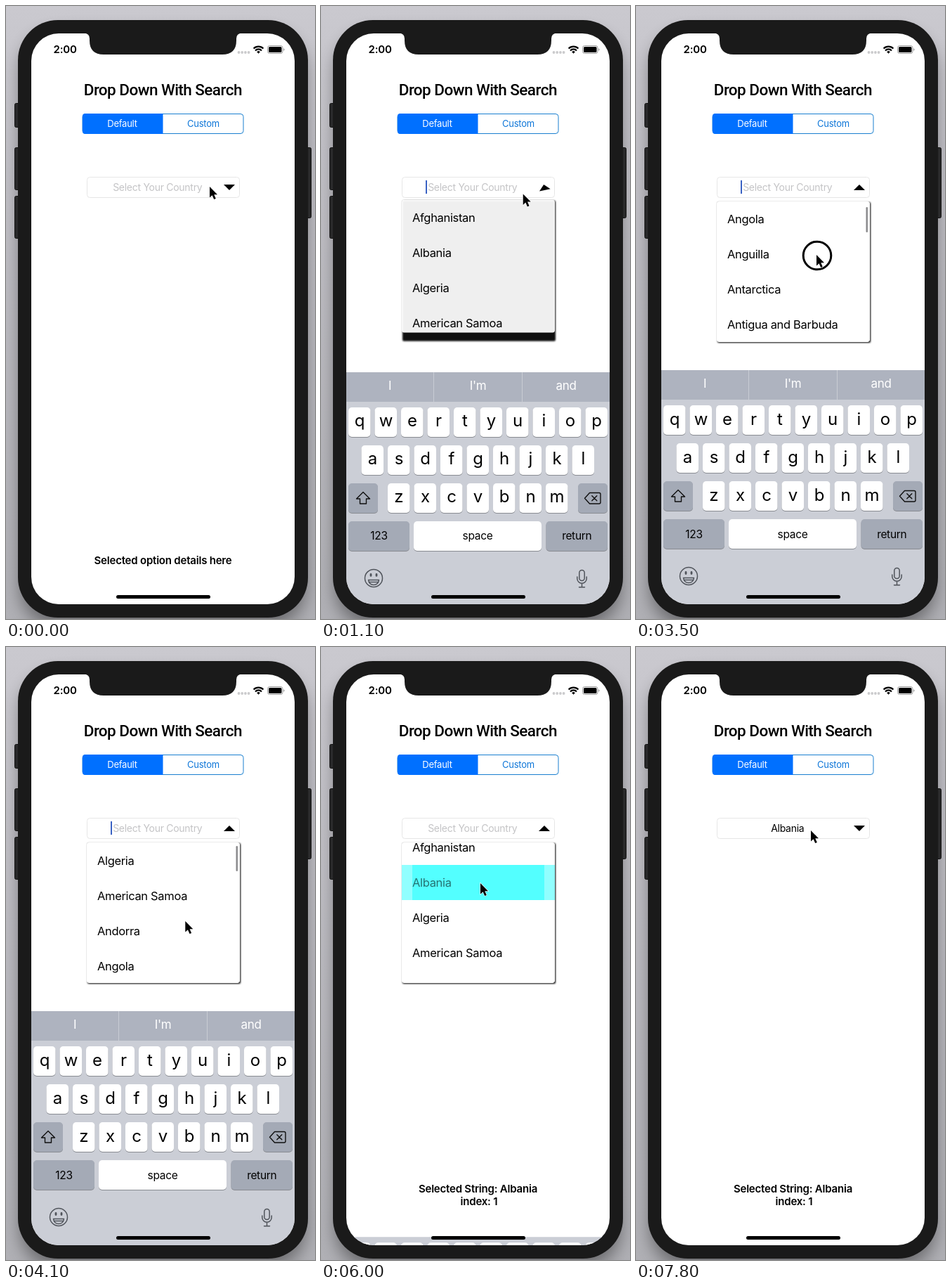
An HTML page for the animation above (8000 ms loop, 440 by 872 pixels).

```html
<!DOCTYPE html>
<html lang="en">
<head>
<meta charset="utf-8">
<title>Drop Down With Search</title>
<style>
  html, body { margin: 0; width: 100%; height: 100%; overflow: hidden; background: #bdbcc2; }
  svg { display: block; width: 440px; height: 872px; font-family: Inter, "Liberation Sans", sans-serif; }
  text { white-space: pre; letter-spacing: -.02em; }
  .mid { text-anchor: middle; }
  .bold { font-weight: 600; letter-spacing: -.014em; }
</style>
</head>
<body>
<svg viewBox="0 0 440 872">
  <defs>
    <linearGradient id="wall" x1="0" y1="0" x2="0" y2="1">
      <stop offset="0" stop-color="#cac9cf"/>
      <stop offset=".3" stop-color="#c0bfc5"/>
      <stop offset="1" stop-color="#b0b0b5"/>
    </linearGradient>
    <filter id="glow" x="-20%" y="-20%" width="140%" height="140%"><feGaussianBlur stdDeviation="12"/></filter>
    <filter id="soft" x="-10%" y="-10%" width="120%" height="120%"><feGaussianBlur stdDeviation="1.2"/></filter>
    <clipPath id="screen"><rect x="36" y="39" width="375" height="812" rx="39"/></clipPath>
    <clipPath id="listClip"><rect id="clipBox" x="115" width="218" rx="3"/></clipPath>
  </defs>

  <rect width="440" height="872" fill="url(#wall)"/>
  <rect x="20" y="38" width="407" height="846" rx="56" opacity=".4" filter="url(#glow)"/>
  <g fill="#29292a" stroke="#111">
    <rect x="12.5" y="138.5" width="8" height="34" rx="2"/>
    <rect x="12.5" y="201.5" width="8" height="60" rx="2"/>
    <rect x="12.5" y="270.5" width="8" height="60" rx="2"/>
    <rect x="426.5" y="201.5" width="8" height="100" rx="2"/>
  </g>
  <rect x="17" y="20" width="413" height="850" rx="57" fill="#1a1a1a"/>

  <g clip-path="url(#screen)">
    <rect x="36" y="39" width="375" height="812" fill="#fff"/>
    <text class="bold" x="67.5" y="67" font-size="15">2:00</text>
    <g fill="#cbcbcd"><circle cx="331.5" cy="66" r="1.9"/><circle cx="336.2" cy="66" r="1.9"/><circle cx="340.9" cy="66" r="1.9"/><circle cx="345.6" cy="66" r="1.9"/></g>
    <g fill="none" stroke="#000" stroke-width="2.2">
      <path d="M352.6 60.6a9.6 9.6 0 0 1 13.8 0M355 63.4a6.2 6.2 0 0 1 9 0"/>
      <path d="M359.5 67.8l-2.3-2.6a3.3 3.3 0 0 1 4.6 0z" fill="#000" stroke="none"/>
    </g>
    <rect x="372.5" y="56.5" width="21.500" height="11" rx="3" fill="none" stroke="#999"/>
    <rect x="374" y="58" width="18.500" height="8" rx="1.600"/>
    <path d="M395.300 60.300q1.400.4 1.400 1.700t-1.400 1.700z" fill="#999"/>

    <text class="mid" x="223.300" y="126.500" font-size="22.500" font-weight="500" style="font-family:Roboto,sans-serif;letter-spacing:-.55px">Drop Down With Search</text>
    <rect x="109" y="153.500" width="229" height="28" rx="4" fill="#fff" stroke="#1a7fd0"/>
    <path d="M223.500 153v29H113a4 4 0 0 1-4-4v-21a4 4 0 0 1 4-4z" fill="#0070ff"/>
    <text class="mid" x="165.500" y="172.300" font-size="13" fill="#fff">Default</text>
    <text class="mid" x="281" y="172.300" font-size="13" fill="#0e76d8">Custom</text>

    <text id="hint" class="mid bold" x="223.500" y="793.500" font-size="15">Selected option details here</text>
    <g id="result" class="mid bold" font-size="15">
      <text x="223.500" y="776" class="bold">Selected String: Albania</text>
      <text x="225" y="793.500" class="bold">index: 1</text>
    </g>

    <rect id="shade" x="116" width="218" height="200" rx="2" filter="url(#soft)"/>
    <g id="list" clip-path="url(#listClip)">
      <rect id="paper" x="115" width="218" rx="3" fill="#fff"/>
      <g id="rows" font-size="16.500"></g>
      <rect id="bar" x="327.500" width="2.500" rx="1.250" fill="#8c8c8e"/>
    </g>

    <rect x="115.500" y="243.500" width="217" height="29" rx="4" fill="#fff" stroke="#e6e6e6"/>
    <text id="field" class="mid" x="215.800" y="262.800" font-size="14"></text>
    <rect id="caret" x="149" y="248" width="2" height="19" fill="#3a62c4"/>
    <path id="arrow" d="M-8-4H8L0 4z"/>

    <g id="keyboard"></g>
    <rect x="157" y="838" width="134" height="5" rx="2.500"/>
  </g>
  <path d="M111 38.500q8 .5 8 8v2.500q0 20 20 20h169q20 0 20-20v-2.500q0-7.500 8-8z" fill="#1a1a1a"/>

  <g id="cursor">
    <circle id="ring" cx="1" cy="1" r="19.800" fill="none" stroke="#000" stroke-width="3"/>
    <path d="M0 0V15.500L3.600 12.200L6.200 18L8.800 16.900L6.300 11.200H11z" stroke="#fff" stroke-width="1.200" paint-order="stroke"/>
  </g>
</svg>

<script>
const $ = id => document.getElementById(id);
const set = (id, attrs) => { for (const k in attrs) $(id).setAttribute(k, attrs[k]); };
const show = (id, on) => { $(id).style.display = on ? '' : 'none'; };
const clamp = v => Math.min(1, Math.max(0, v));

const OPEN = 735, KEYS_UP = 729, PICK = 5726, CLOSE = PICK + 400, REFRESH = PICK + 500;
const countries = ['Afghanistan', 'Albania', 'Algeria', 'American Samoa', 'Andorra', 'Angola',
  'Anguilla', 'Antarctica', 'Antigua and Barbuda', 'Argentina', 'Armenia'];

// Each entry: time, then values
const pointer = [[0, 290, 257], [900, 290, 257], [1900, 268, 357], [2200, 268, 357], [2400, 267, 378],
  [2700, 262, 322], [3300, 257, 354], [3500, 257, 354], [3900, 256, 420], [4400, 254, 335], [4500, 254, 335],
  [4800, 255, 368], [4950, 255, 369], [5200, 232, 354], [5400, 227, 336], [6100, 227, 336],
  [6800, 281, 318], [7100, 296, 315], [7200, 296, 315], [7800, 249, 261]];
const scroll = [[2400, 0], [2700, 60], [3300, 250], [3500, 250], [3900, 170], [4350, 0], [4500, 0],
  [4800, -16.5], [4950, -17], [5150, 0], [5200, 0], [5400, 18]];
const presses = [[400, 600], [2400, 2700], [3400, 3900], [4500, 5000], [5200, 5400], [5600, 5700]];

function track(keys, t) {
  const i = keys.findIndex(k => k[0] > t);
  if (i < 0) return keys[keys.length - 1].slice(1);
  if (i === 0) return keys[0].slice(1);
  const a = keys[i - 1], b = keys[i];
  let u = (t - a[0]) / (b[0] - a[0]);
  u = u * u * (3 - 2 * u);
  return a.slice(1).map((v, j) => v + (b[j + 1] - v) * u);
}

// Spring progress 0 to 1; damping 1 is critical
function spring(ms, damping, freq) {
  if (ms <= 0) return 0;
  const s = ms / 1000, d = damping * freq;
  if (damping === 1) return 1 - (1 + d * s) * Math.exp(-d * s);
  const w = freq * Math.sqrt(1 - damping * damping);
  return 1 - Math.exp(-d * s) * (Math.cos(w * s) + d / w * Math.sin(w * s));
}

function buildKeyboard() {
  const label = (x, y, str, size, fill = '#000') =>
    `<text class="mid" x="${x}" y="${y}" font-size="${size}" fill="${fill}">${str}</text>`;
  const key = (x, y, w, str = '', size = 24, fill = '#fff') =>
    `<rect x="${x}" y="${y + 1}" width="${w}" height="42" rx="5" fill="#898c92"/>` +
    `<rect x="${x}" y="${y}" width="${w}" height="42" rx="5" fill="${fill}"/>` +
    label(x + w / 2, y + (size > 20 ? 27.5 : 26.5), str, size);
  const row = (x, y, letters) => [...letters].map((c, i) => key(x + i * 37.5, y, 31.5, c)).join('');
  const gray = '#a4aab6';
  $('keyboard').innerHTML =
    '<g id="tips"><path d="M36 518h375v42H36z" fill="#aeb3bf"/>' +
    '<path d="M160.5 518v42M286.5 518v42" stroke="#c9ccd4"/>' +
    label(98, 543, 'I', 17, '#fff') + label(223.5, 543, "I'm", 17, '#fff') + label(349, 543, 'and', 17, '#fff') + '</g>' +
    '<path d="M36 560h375v291H36z" fill="#cbced6"/>' +
    row(39, 568, 'qwertyuiop') + row(57.5, 622, 'asdfghjkl') + row(95, 676, 'zxcvbnm') +
    key(39, 676, 42, '', 24, gray) + key(366, 676, 42, '', 24, gray) +
    key(39, 730, 87, '123', 15.5, gray) + key(132, 730, 182, 'space', 15.5) + key(320.5, 730, 87.5, 'return', 15.5, gray) +
    '<g fill="none" stroke="#111" stroke-width="1.4" stroke-linejoin="round" stroke-linecap="round">' +
    '<path d="M60 688.500l9.500 9.500h-5v7h-9v-7h-5z"/>' +
    '<path d="M382.500 689.500H396q2 0 2 2v11.500q0 2-2 2H382.500L375.500 697.300zM385.800 693.800l7 7m0-7l-7 7"/></g>' +
    '<g fill="none" stroke="#50545b" stroke-width="1.5" stroke-linecap="round">' +
    '<circle cx="75" cy="811" r="12.500"/><path d="M67.500 813.500h15q-1 7-7.500 7t-7.500-7z" stroke-linejoin="round"/><path d="M68.500 816.500h13"/>' +
    '<path d="M71 805.500v2M79 805.500v2" stroke-width="2.800"/>' +
    '<rect x="367.800" y="799.500" width="7.400" height="15" rx="3.700"/>' +
    '<path d="M364.800 809v2.500a6.700 6.700 0 0 0 13.400 0V809M371.500 818.500v5M367.500 823.800h8"/></g>';
}

function buildRows() {
  $('rows').innerHTML = countries.map((name, i) =>
    (i === 1 ? '<g id="mark" fill="#0ff"><path d="M115 50h218v50H115z"/><path d="M130 50h188v50H130z"/></g>' : '') +
    `<text id="row${i}" x="130" y="${i * 50 + 31}">${name}</text>`).join('');
}

function draw(t) {
  const picked = t >= PICK, done = t >= REFRESH;

  // Drop-down list
  const up = spring(t - OPEN, .4, 19), down = spring(t - CLOSE, .9, 8);
  const top = 243 + 35 * (up - down);
  const height = Math.max(0, t < CLOSE ? 30 + 170 * up : 200 * (1 - down));
  const visible = t >= OPEN && t < 6900;
  show('list', visible);
  show('shade', visible);
  set('list', { opacity: clamp(up) });
  set('shade', { y: top + 1, opacity: clamp(up) * clamp(1 - down) });
  set('clipBox', { y: top, height });
  set('paper', { y: top, height });

  const [offset] = track(scroll, t);
  set('rows', { transform: `translate(0 ${top - offset})` });
  set('bar', {
    y: top + 3 + Math.max(0, offset) * .02,
    height: 36 + Math.min(0, offset),
    opacity: clamp((t - 2400) / 100) * clamp((5700 - t) / 250)
  });

  // Chosen row fades in over its highlight
  const fade = clamp((t - PICK) / 500);
  for (const part of $('mark').children) part.setAttribute('opacity', fade ** 1.4);
  set('row1', { opacity: picked ? fade : 1 });

  // Text field
  $('field').textContent = done ? 'Albania' : 'Select Your Country';
  set('field', { fill: done ? '#000' : '#c4c4c6' });
  show('caret', t >= OPEN && !picked && (t + 550) % 1000 < 700);
  set('arrow', { transform: `translate(318 258) rotate(${180 * (up - down)})` });
  show('hint', !picked);
  show('result', picked);

  // Keyboard slides without its suggestion strip on the way out
  const slide = picked ? 291 * spring(t - PICK, 1, 18.26) : 333 * (1 - spring(t - KEYS_UP, 1, 18.26));
  set('keyboard', { transform: `translate(0 ${slide})` });
  show('tips', !picked);

  const [x, y] = track(pointer, t);
  set('cursor', { transform: `translate(${x} ${y})` });
  show('ring', presses.some(([a, b]) => t >= a && t < b));
}

buildKeyboard();
buildRows();
const start = performance.now();
function tick() {
  const t = (performance.now() - start) % 8000;
  draw(Math.floor(t / 100) * 100);
  requestAnimationFrame(tick);
}
tick();
</script>
</body>
</html>
```
